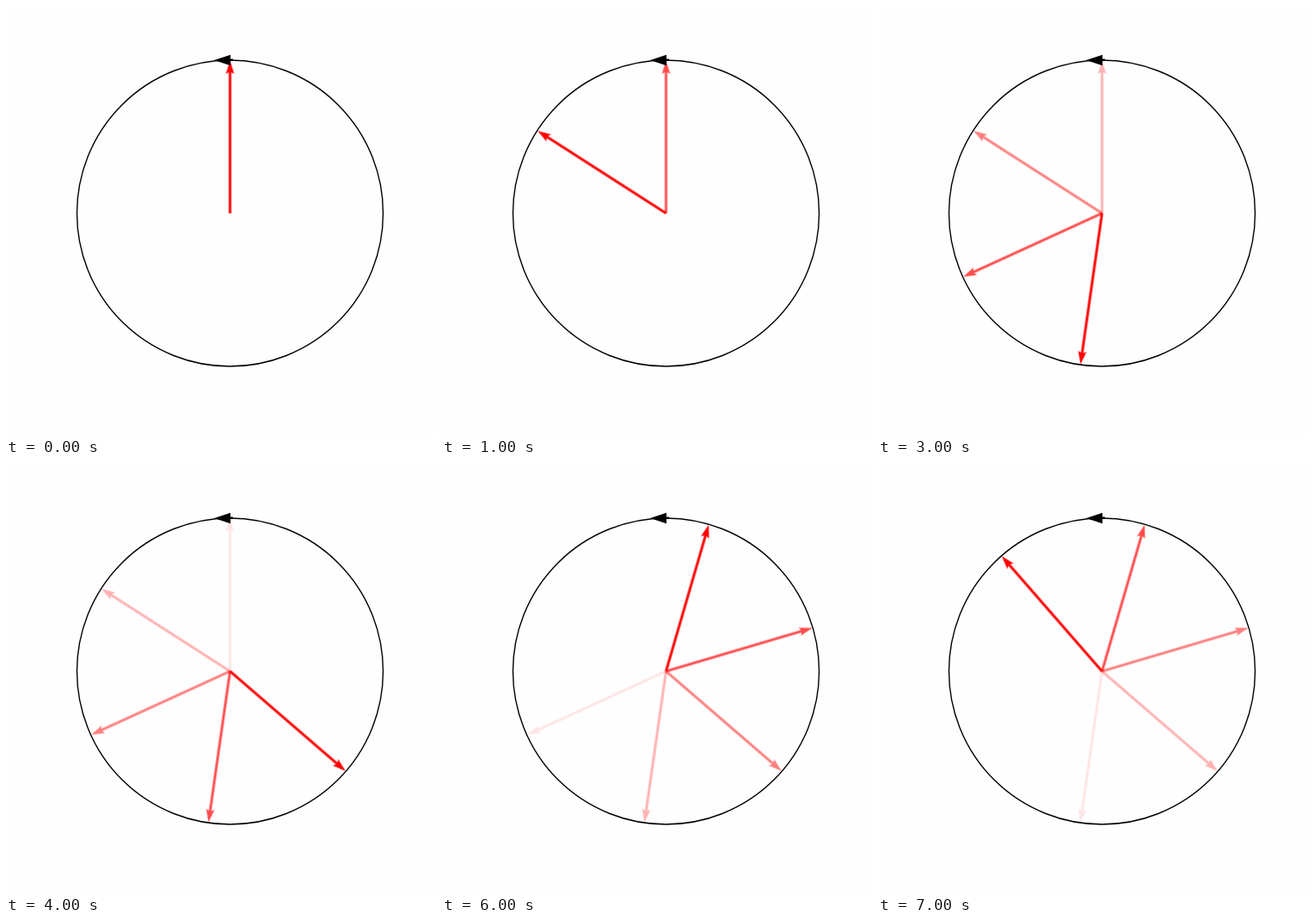
These frames come from a looping animation (500x500 px, 8000 ms). An HTML page:

```html
<!DOCTYPE html>
<html lang="en">
<head>
<meta charset="utf-8">
<title>Radian steps</title>
<style>
  html, body { margin: 0; width: 100%; height: 100%; overflow: hidden; background: #fefefe; }
  svg { display: block; width: 500px; height: 500px; }
</style>
</head>
<body>
<svg viewBox="0 0 500 500">
  <circle cx="260.5" cy="241" r="178" fill="none" stroke="#000" stroke-width="1.4"/>
  <g id="hands" transform="translate(260.5 241)"></g>
  <path d="M242 63L261 56.8V61.6H264V64H261V69.2Z"/>
</svg>
<script>
const STEP = 1000, COUNT = 8;
const FADE = [1, 0.7, 0.5, 0.3, 0.1];
const hands = document.getElementById('hands');

function addHand(k) {
  const hand = document.createElementNS('http://www.w3.org/2000/svg', 'path');
  // Points up; each hand is one radian further counter-clockwise.
  hand.setAttribute('d', 'M-1.5 0V-164L-4.9 -162L0 -177.5L4.9 -162L1.5 -164V0Z');
  hand.setAttribute('transform', `rotate(${-k * 180 / Math.PI})`);
  hand.setAttribute('fill', '#f00');
  hands.append(hand);

  const frames = Array.from({ length: COUNT + 1 }, (_, i) => ({
    opacity: FADE[i - k] ?? 0,
    offset: i / COUNT,
    easing: 'steps(1, end)'
  }));
  const anim = hand.animate(frames, { duration: STEP * COUNT, iterations: Infinity });
  anim.startTime = 0;
  return anim;
}

const anims = Array.from({ length: COUNT }, (_, k) => addHand(k));
const start = document.timeline.currentTime ?? 0;
anims.forEach(a => { a.startTime = start; });
</script>
</body>
</html>
```
